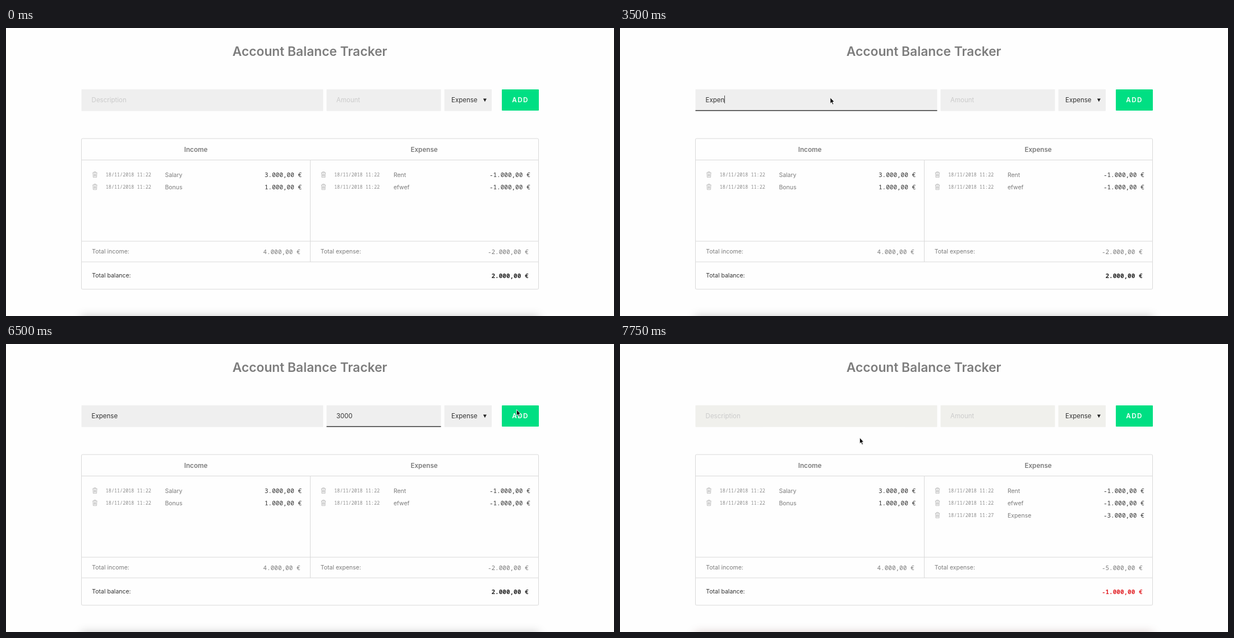
An HTML page for the animation above (8000 ms loop, 1084 by 516 pixels).

```html
<!DOCTYPE html>
<html lang="en">
<head>
<meta charset="utf-8">
<title>Account Balance Tracker</title>
<style>
  html, body { margin: 0; width: 100%; height: 100%; overflow: hidden; background: #fefefe; }
  svg { display: block; width: 1084px; height: 516px; }
  text { font-family: Inter, Roboto, sans-serif; font-size: 10.5px; font-optical-sizing: none; fill: #7b7b7b; white-space: pre; }
  .title { font-size: 22.8px; font-weight: 600; fill: #7d7d7d; }
  .head { font-size: 11.7px; font-weight: 600; fill: #7b7b7b; }
  .field { font-size: 11.5px; fill: #333; }
  .hint { fill: #cbcbcb; }
  .add { font-size: 11.6px; font-weight: 600; letter-spacing: 1.4px; fill: #fff; }
  .mono { font-family: "Noto Sans Mono", "DejaVu Sans Mono", monospace; font-size: 11px; }
  .date { font-size: 8.45px; fill: #8c8c8c; }
  .dark { fill: #333; }
  .bold { font-weight: 700; fill: #262626; }
  .mid { text-anchor: middle; }
  .end { text-anchor: end; }
  .lines { fill: none; stroke: #d9d9d9; }
  .bin { fill: none; stroke: #b9b9b9; stroke-width: .9; }
  #shadow { filter: blur(8px); }
</style>
</head>
<body>
<svg id="stage" viewBox="0 0 1084 516">
  <rect id="shadow" x="134" y="516" width="816" height="90"/>
  <text class="title mid" x="541.7" y="50">Account Balance Tracker</text>

  <g id="fields">
    <rect x="134.5" y="109.7" width="431" height="39" rx="1"/>
    <rect x="571.5" y="109.7" width="204" height="39" rx="1"/>
    <rect x="781.5" y="109.7" width="84.5" height="39" rx="1"/>
  </g>
  <rect id="focus" y="147.1" height="1.6" fill="#444"/>
  <text id="desc" class="field" x="152.6" y="132.7"></text>
  <text id="amount" class="field" x="589" y="132.7"></text>
  <rect id="caret" y="121" width="1" height="14" fill="#444"/>
  <text class="field" x="794" y="133.2">Expense</text>
  <path d="M850.8 126.6h6l-3 5.6z" fill="#222"/>
  <rect x="884" y="110" width="66" height="38" rx="1" fill="#00df83"/>
  <text class="add" x="902.3" y="133.3">ADD</text>

  <g class="lines">
    <rect x="134.5" y="198" width="815" height="270" rx="2" fill="#fefefe"/>
    <path d="M134.5 236.5h815M134.5 382h815M134.5 419h815M542.5 236.5V419"/>
  </g>
  <text class="head mid" x="338.6" y="221.7">Income</text>
  <text class="head mid" x="745.6" y="221.7">Expense</text>
  <g id="rows"></g>
  <text x="153.3" y="404.3">Total income:</text>
  <text class="mono end" x="524.5" y="404.5">4.000,00 €</text>
  <text x="560.8" y="404.3">Total expense:</text>
  <text id="spent" class="mono end" x="931.5" y="404.5"></text>
  <text class="dark" x="153.3" y="447.3">Total balance:</text>
  <text id="balance" class="mono bold end" x="931.5" y="447.5"></text>

  <path id="cursor" d="M.8 1.2V12.2L3.3 9.9 5 13.9 6.9 13.1 5.2 9.2H8.3Z" fill="#0a0a0a" stroke="#fff" stroke-width=".9"/>
</svg>
<script>
const LOOP = 8000;
const $ = id => document.getElementById(id);
const set = (el, attrs) => {
  for (const key in attrs) el.setAttribute(key, attrs[key]);
};
const show = (el, on) => { el.style.display = on ? "" : "none"; };

const BIN = "M.5 2.3H8.9M3 2.1V.7H6.4V2.1M1.2 2.5 1.7 10.6H7.7L8.2 2.5M3.2 4.2V9M4.7 4.2V9M6.2 4.2V9";
const row = (id, x, y, date, name, sum) => `<g id="${id}">
  <path class="bin" d="${BIN}" transform="translate(${x} ${y - 6})"/>
  <text class="mono date" x="${x + 24}" y="${y + 3.2}">${date}</text>
  <text x="${x + 129.6}" y="${y + 4}">${name}</text>
  <text class="mono dark end" x="${x + 373.2}" y="${y + 4.3}">${sum} €</text></g>`;
$("rows").innerHTML =
  row("salary", 153.8, 263, "18/11/2018 11:22", "Salary", "3.000,00") +
  row("bonus", 153.8, 285, "18/11/2018 11:22", "Bonus", "1.000,00") +
  row("rent", 561.3, 263, "18/11/2018 11:22", "Rent", "-1.000,00") +
  row("other", 561.3, 285, "18/11/2018 11:22", "efwef", "-1.000,00") +
  row("added", 561.3, 307, "18/11/2018 11:27", "Expense", "-3.000,00");

// Each step overrides the values set so far.
const steps = [
  [0, { desc: "", amount: "", focus: "", caret: false, cursor: null, added: false, late: false }],
  [500, { cursor: [506, 39] }],
  [750, { cursor: [422, 95] }],
  [1000, { cursor: [357, 145] }],
  [1250, { cursor: [374, 123.3] }],
  [2000, { focus: "desc", caret: true }],
  [2500, { caret: false }],
  [2750, { desc: "E", caret: true }],
  [3000, { desc: "Ex" }],
  [3250, { desc: "Exp" }],
  [3500, { desc: "Expen" }],
  [3750, { desc: "Expens" }],
  [4000, { desc: "Expense" }],
  [4500, { focus: "amount" }],
  [5000, { caret: false }],
  [5250, { amount: "3", caret: true }],
  [5500, { amount: "30" }],
  [5750, { amount: "3000" }],
  [6250, { caret: false, cursor: [706.5, 137] }],
  [6500, { cursor: [909.5, 116.3] }],
  [6750, { caret: true, cursor: [914.5, 128.5] }],
  [7000, { cursor: [923, 137] }],
  [7250, { desc: "", amount: "", focus: "", caret: false, added: true }],
  [7500, { cursor: [529, 176], late: true }],
  [7750, { cursor: [426.5, 166.5] }]
];
const boxes = { desc: [134.5, 431], amount: [571.5, 204] };

function fill(id, value, hint) {
  const el = $(id);
  el.textContent = value || hint;
  el.classList.toggle("hint", !value);
}

function draw(s) {
  fill("desc", s.desc, "Description");
  fill("amount", s.amount, "Amount");

  show($("focus"), s.focus);
  show($("caret"), s.caret);
  if (s.focus) {
    const [x, width] = boxes[s.focus];
    const el = $(s.focus);
    const typed = s[s.focus] ? el.getComputedTextLength() : 0;
    set($("focus"), { x, width });
    set($("caret"), { x: Math.round(+el.getAttribute("x") + typed - .5) });
  }

  show($("cursor"), s.cursor);
  if (s.cursor) set($("cursor"), { transform: `translate(${s.cursor})` });

  show($("added"), s.added);
  $("spent").textContent = s.added ? "-5.000,00 €" : "-2.000,00 €";
  $("balance").textContent = s.added ? "-1.000,00 €" : "2.000,00 €";
  $("balance").style.fill = s.added ? "#e3262b" : "";
  set($("fields"), { fill: s.late ? "#f0f0ec" : "#efefef" });
  set($("shadow"), { fill: s.late ? "rgba(70,10,10,.19)" : "rgba(0,0,0,.2)" });
}

let last = -1;
function tick() {
  const t = performance.now() % LOOP;
  const now = steps.filter(([at]) => at <= t).length;
  if (now !== last) {
    draw(Object.assign({}, ...steps.slice(0, now).map(step => step[1])));
    last = now;
  }
  requestAnimationFrame(tick);
}
tick();
</script>
</body>
</html>
```
